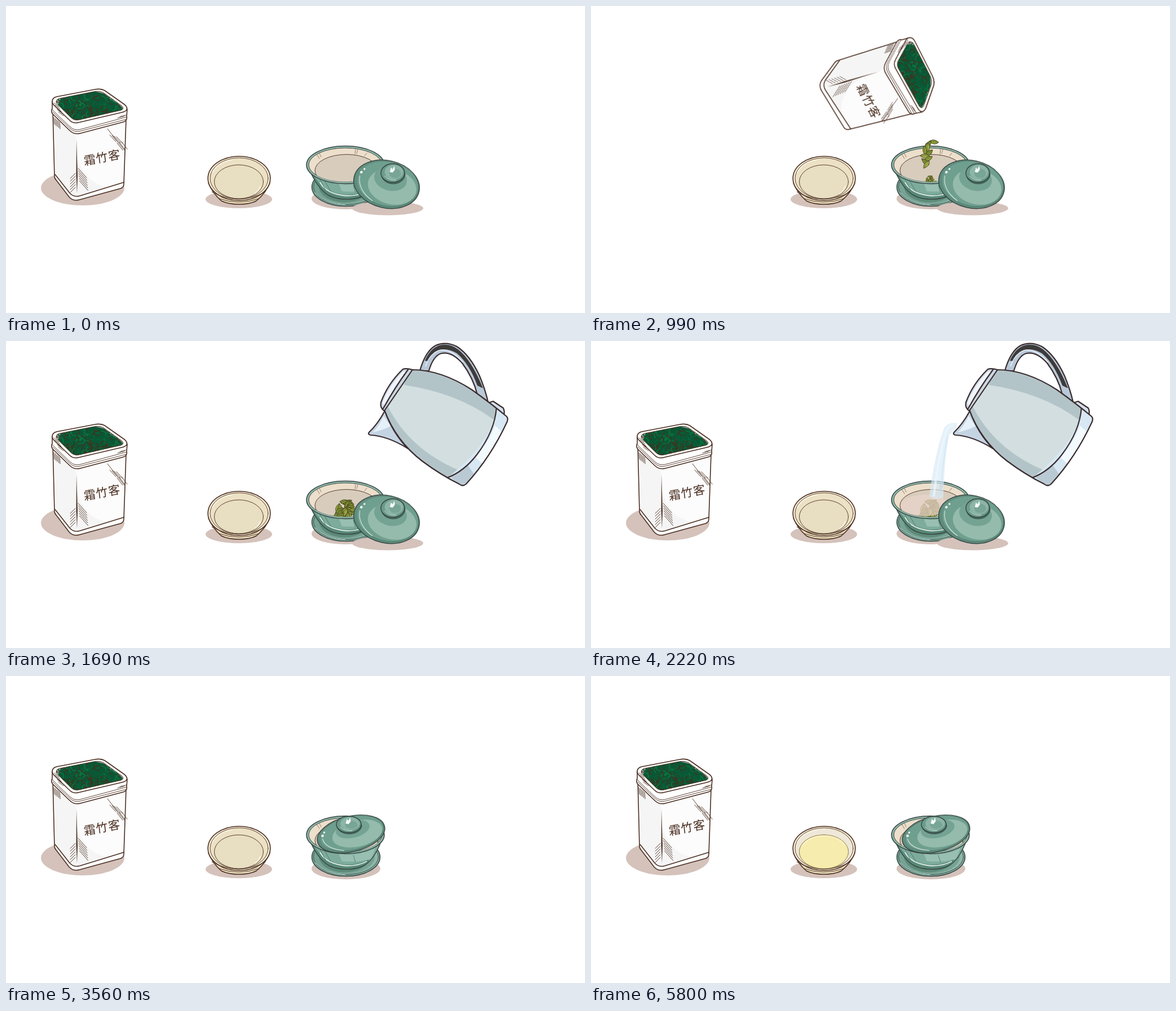
These frames come from a looping animation (1027x545 px, 6700 ms). An HTML page:

```html
<!DOCTYPE html>
<html lang="zh">
<head>
<meta charset="utf-8">
<title>Tea brewing</title>
<style>
html, body { margin: 0; width: 100%; height: 100%; overflow: hidden; background: #fff; }
svg { display: block; width: 1027px; height: 545px; }
.brown { stroke: #4a2e20; stroke-width: 1.6; stroke-linejoin: round; stroke-linecap: round; }
.teal { stroke: #3a4745; stroke-width: 1.5; stroke-linejoin: round; stroke-linecap: round; }
.steel { stroke: #3b2d2f; stroke-width: 2.2; stroke-linejoin: round; stroke-linecap: round; }
.thin { stroke-width: .9; }
.none { fill: none; }
.shade { fill: #d4c2bb; }
.label { font: 500 21px "Noto Sans CJK SC", "Noto Serif", serif; letter-spacing: 1px; fill: #4a2e20; }
.a { animation: 6700ms step-end infinite; }

.stand { animation-name: stand; }
.tilt { animation-name: tilt; }
.fall { animation-name: fall; }
.pile { animation-name: pile; transform-origin: 600px 314px; }
.kettle { animation-name: kettle; transform-origin: 775px 130px; }
.stream { animation-name: stream; }
.water { animation-name: water; transform-origin: 592px 292px; }
.side { animation-name: side; }
.shut { animation-name: shut; }
.ajar { animation-name: ajar; }
.gaiwan { animation-name: gaiwan; }
.pour { animation-name: pour; }
.tea { animation-name: tea; transform-origin: 413px 342px; }
.wall { animation-name: wall; }

@keyframes stand { 0%, 21.194% { opacity: 1 } 10.895% { opacity: 0 } }
@keyframes tilt { 0%, 21.194% { opacity: 0 } 10.895% { opacity: 1 } }
@keyframes fall {
  0%, 16.119% { opacity: 0 }
  12.835% { opacity: 1; transform: none }
  13.582% { opacity: 1; transform: translateY(32px) }
  14.328% { opacity: 1; transform: translateY(64px) }
  15.074% { opacity: 1; transform: translateY(92px) }
}
@keyframes pile {
  0%, 36.566% { opacity: 0 }
  14.328% { opacity: 1; transform: scale(.4) }
  15.074% { opacity: 1; transform: scale(.6) }
  16.119% { opacity: 1; transform: scale(.82) }
  17.164% { opacity: 1; transform: none }
}
@keyframes kettle {
  0%, 40.597% { opacity: 0 }
  22.686%, 39.104% { opacity: 1; transform: rotate(10deg) }
  25.223% { opacity: 1; transform: none }
}
@keyframes stream {
  0%, 36.566% { opacity: 0; clip-path: none }
  25.223% { opacity: 1; clip-path: polygon(560px 0, 700px 0, 700px 225px, 560px 225px) }
  27.164% { opacity: 1; clip-path: none }
}
@keyframes water {
  0%, 36.566% { opacity: 0 }
  27.164% { opacity: .75; transform: scale(.6) }
  30.149% { opacity: .75; transform: scale(.8) }
  33.134% { opacity: .75; transform: none }
}
@keyframes side { 0% { opacity: 1 } 36.566%, 100% { opacity: 0 } }
@keyframes shut { 0%, 53.134% { opacity: 0 } 36.566% { opacity: 1 } }
@keyframes ajar { 0% { opacity: 0 } 53.134%, 100% { opacity: 1 } }
@keyframes gaiwan {
  0%, 86.566% { transform: none }
  60.149% { transform: translate(540px, 198px) rotate(-15deg) translate(-608px, -264px) }
  67.164% { transform: translate(485px, 193px) rotate(-35.5deg) translate(-608px, -264px) }
}
@keyframes pour { 0%, 77.164% { opacity: 0 } 68.208% { opacity: 1 } }
@keyframes tea {
  0% { opacity: 0; transform: scale(.48) }
  68.208% { opacity: 1; transform: scale(.48) }
  73.134% { opacity: 1; transform: scale(.54); animation-timing-function: steps(8, end) }
  77.164%, 100% { opacity: 1; transform: none }
}
@keyframes wall { 0% { opacity: 0 } 77.164%, 100% { opacity: 1 } }
</style>
</head>
<body>
<svg viewBox="0 0 1027 545">
<defs>
  <clipPath id="mouth"><path d="M89 172Q88 166 95 164L156 152Q166 150 173 154L205 177Q211 182 204 185L130 202Q121 204 115 198Z"/></clipPath>
  <clipPath id="bowlIn"><ellipse cx="602" cy="282" rx="65" ry="30"/></clipPath>
  <clipPath id="bowlOut"><path id="bowlShape" d="M541 297Q556 328 574 337Q586 343 604 343Q624 343 636 336Q652 326 664 297Z"/></clipPath>
  <clipPath id="kettleBody"><path id="body" d="M720 51Q772 51 827 87Q863 113 888 134Q891 137 889 143Q860 206 816 254Q810 259 804 254Q770 237 738 213Q691 177 671 122Z"/></clipPath>

  <g id="tin" class="brown none">
    <path d="M83 186L86 302Q86 306 89 309L112 339Q119 347 130 344L203 324Q209 322 209 316L213 200L122 222Z" fill="#fcfcfc"/>
    <path d="M85 196L122 226L126 240L126 335Q118 337 112 330L88 300Z" fill="#f5f5f5" stroke="none"/>
    <path d="M127 270Q140 314 178 321L131 336L127 331Z" fill="#f5f5f5" stroke="none"/>
    <path d="M87 299L113 332Q120 340 131 337L209 313"/>
    <path d="M125 238L127 300L126 333L124.500 300Z" fill="#4a2e20" stroke="none"/>
    <path d="M82 170L82 182Q79 187 83 192L113 221Q121 229 132 226L208 206Q216 203 214 196L215 183L170 148Z" fill="#fff"/>
    <path d="M82 184L113 214Q121 222 132 219L214 197M83 188L113 217Q121 225 132 222L214 201" class="thin"/>
    <path d="M82 172Q81 163 90 161L158 148Q168 146 175 150L209 174Q216 179 214 184Q213 187 205 189L128 207Q119 209 113 203L86 177Q82 173 82 170" fill="#fff"/>
    <g clip-path="url(#mouth)">
      <path d="M80 145h140v65h-140z" fill="#a3a09e" stroke="none"/>
      <path d="M92 176L97 164Q108 164 113 157Q126 159 134 154Q147 155 155 151L175 156L187 167Q198 170 207 182L200 200L120 208Z" fill="#0a5735" stroke="none"/>
      <g id="leaves"></g>
    </g>
    <path d="M89 172Q88 166 95 164L156 152Q166 150 173 154L205 177Q211 182 204 185L130 202Q121 204 115 198Z" class="thin"/>
    <path id="hatch" class="thin"/>
    <text class="label" stroke="none" transform="translate(139 283) rotate(-11) skewX(-4)">霜竹客</text>
  </g>
</defs>

<g class="a stand">
  <ellipse class="shade" cx="136" cy="323" rx="74" ry="31"/>
  <use href="#tin"/>
</g>

<!-- cup -->
<ellipse class="shade" cx="413" cy="343" rx="59" ry="16"/>
<g class="brown none">
  <path d="M359 314Q366 332 382 346Q394 352 413 352Q433 352 444 346Q461 332 468 314Z" fill="#e6d9ba"/>
  <path d="M378 342Q412 354 449 342" class="thin"/>
  <ellipse cx="413.500" cy="306" rx="55.300" ry="39.300" fill="#f7eed8"/>
  <ellipse cx="413.500" cy="306" rx="51.500" ry="36.500" fill="#ece1c5" class="thin"/>
  <ellipse class="a wall" cx="413.500" cy="306" rx="50.500" ry="35.500" fill="#eee8d9" stroke="none"/>
  <ellipse cx="413" cy="312" rx="43.500" ry="30" fill="#e8dec1" class="thin"/>
  <path d="M366 295Q376 277 401 273M451 320Q448 329 441 333" stroke="#fbf6e7"/>
  <g class="a tea">
    <ellipse cx="413" cy="312" rx="43.500" ry="30" fill="#f6ecad" stroke="#a8905b" stroke-width=".8"/>
    <path d="M376 300Q388 284 414 284Q438 284 449 299" stroke="#fffbe2" stroke-width="1.200"/>
  </g>
  <path d="M365 330Q412 356 460 330" class="thin"/>
</g>
<path class="a pour" d="M445 244Q432 244 428 256Q419 285 409 326Q415 330 421 326Q430 288 438 264Z" fill="#f5ecb4" opacity=".9"/>

<!-- saucer -->
<ellipse class="shade" cx="603" cy="342" rx="61" ry="19"/>
<ellipse class="teal" cx="603" cy="321.500" rx="60.500" ry="34" fill="#76a395"/>
<ellipse cx="606" cy="321" rx="55" ry="31" fill="#90b7a9"/>
<ellipse cx="602" cy="321" rx="52" ry="30" fill="#76a293"/>
<ellipse cx="600" cy="320" rx="45" ry="28.500" fill="#5d8a79"/>
<ellipse class="teal none thin" cx="603" cy="321" rx="57.500" ry="31.500"/>
<path class="none" d="M548 331Q566 351 602 353" stroke="#b9d4ca" stroke-width="1"/>

<g class="a gaiwan">
  <g clip-path="url(#bowlOut)">
    <path d="M530 280h140v70h-140z" fill="#7dab9c"/>
    <path d="M540 290Q558 332 604 335Q634 334 646 322L636 345L560 345L538 300Z" fill="#588877"/>
    <path d="M590 315Q620 322 655 306L648 325Q626 331 596 329Z" fill="#98bfb1"/>
    <path class="none" d="M557 313Q568 334 604 337Q626 337 640 329" stroke="#dcebe5" stroke-width="1.800"/>
    <path class="none" d="M556 306L567 327M566 312L576 329M616 318L620 331" stroke="#3a6557" stroke-width=".7"/>
  </g>
  <use href="#bowlShape" class="teal none"/>
  <ellipse class="teal" cx="602" cy="282" rx="69" ry="33.500" fill="#77a495"/>
  <ellipse class="none" cx="602" cy="282" rx="67" ry="31.700" stroke="#a9c9be"/>
  <ellipse class="teal thin" cx="602" cy="282" rx="65" ry="30" fill="#ecdfcb"/>
  <g clip-path="url(#bowlIn)">
    <ellipse class="brown thin" cx="604" cy="292" rx="56" ry="28.500" fill="#d8ccbd"/>
    <path class="brown none thin" d="M551 263L556 271M555 260L559 268M620 255L619 263M624 255L622 262M640 261L636 266" opacity=".6"/>
    <g id="pile" class="a pile"></g>
    <ellipse class="a water" cx="592" cy="292" rx="43" ry="19" fill="#ead4ca"/>
  </g>
  <g id="shut" class="a shut"></g>
  <g id="ajar" class="a ajar"></g>
</g>

<g id="fall" class="a fall"></g>
<use href="#tin" class="a tilt" style="transform: translate(704px, -69px) rotate(74deg)"/>

<g class="a stream">
  <path d="M650 146Q630 143 625 158Q610 200 600 276Q612 283 625 278Q626 215 635 168L648 153Z" fill="#d8eaf7" opacity=".68"/>
  <path class="none" d="M642 149Q631 151 628 166Q614 220 608 276" stroke="#eef7fd" stroke-width="4" opacity=".7"/>
  <path class="none" d="M632 170Q622 225 621 275" stroke="#bfdcf0" stroke-width="1.500" opacity=".5"/>
</g>

<g id="side" class="a side"><ellipse class="shade" cx="677" cy="359" rx="63" ry="12.500"/></g>

<g class="a kettle">
  <path class="steel" d="M734 53Q744 18 762 8Q780 0 800 10Q823 25 840 62Q850 86 855 108L836 95Q829 66 809 39Q790 18 772 22Q758 26 750 53Z" fill="#b9c8d8"/>
  <path d="M743 35Q752 14 768 8Q786 3 802 15Q826 34 846 84L836 79Q822 41 800 22Q778 9 762 20Q754 25 749 36Z" fill="#3d3b3a"/>
  <path class="none" d="M744 45Q753 20 771 16Q790 14 811 38" stroke="#eaf2fa" stroke-width="1.600"/>
  <path class="steel" d="M855 110L864 107L882 119Q885 125 883 132L870 124Z" fill="#d5dfec"/>
  <path class="steel" d="M672 124Q659 148 644 162Q641 166 647 167Q678 169 713 191Q686 164 672 124Z" fill="#c4d4e2"/>
  <path d="M670 133Q662 150 651 162Q670 158 682 151Z" fill="#e5f0f9"/>
  <g clip-path="url(#kettleBody)">
    <path d="M650 40h250v225h-250z" fill="#d2dedf"/>
    <path d="M715 48L780 48L895 125L864 139Q800 92 706 78Z" fill="#b3c4c9"/>
    <path d="M665 115L677 116Q716 192 802 229L790 255L700 210Z" fill="#b3c4c9"/>
    <path d="M870 118Q864 178 782 244L812 262L897 138Z" fill="#d7e7f3"/>
    <path d="M867 150Q858 178 832 206L849 222Q872 192 884 165Z" fill="#f3fafe"/>
    <path d="M789 242L812 261L832 239L818 219Z" fill="#b9cad5"/>
    <path class="steel none" d="M870 118Q867 160 835 202Q812 232 782 243" stroke-width="1.300"/>
  </g>
  <use href="#body" class="steel none"/>
  <path class="steel" d="M704 50Q710 48 721 51L671 124Q663 119 665 109Q677 76 704 50Z" fill="#cbd7e4"/>
  <path d="M704 54L710 54Q688 81 672 115Q667 113 668 108Q681 77 704 54Z" fill="#eff5fb"/>
  <path class="steel none" d="M713 51Q690 82 669 120" stroke-width="1.200"/>
</g>
</svg>

<script>
const $ = id => document.getElementById(id);
let seed = 7;
const rnd = () => (seed = seed * 16807 % 2147483647) / 2147483647;
const span = (a, b) => a + (b - a) * rnd();

// Curled leaves in the tin
let curls = '';
for (let i = 0; i < 150; i++) {
  const color = ['#0c7a45', '#42301c', '#0a6239', '#4a2e20'][i % 4];
  const spot = `translate(${span(90, 206).toFixed(1)} ${span(155, 203).toFixed(1)}) rotate(${(rnd() * 360).toFixed()})`;
  curls += `<path d="M-5 2Q0 -5 6 1" stroke="${color}" stroke-width="1.200" transform="${spot}"/>`;
}
$('leaves').innerHTML = curls;

// Rows of parallel pen strokes: start, count, step, stroke vector
const rows = [
  [128, 288, 6, .5, 4.5, 15, 17], [114, 331, 6, 0, -5, 9, -9],
  [180, 218, 1, 0, 0, 30, 38], [184, 229, 4, 4, 1, 11, 12], [197, 243, 3, 4, -1, 10, 13],
  [85, 172, 5, 2, 4, 9, 7], [85, 198, 5, 2.5, 2, 1, 12], [198, 199, 3, 4, -1, 8, -4]
];
$('hatch').setAttribute('d', rows.map(([x, y, n, sx, sy, dx, dy]) =>
  Array.from({ length: n }, (_, i) => `M${x + i * sx} ${y + i * sy}l${dx} ${dy}`).join('')).join(''));

const leaf = (x, y, turn, i) => `<g transform="translate(${x} ${y}) rotate(${turn})">
  <path d="M-8 2Q-3 -7 8 -4Q5 5 -8 2Z" fill="${['#8f9f3b', '#7f9135', '#a3af4c'][i % 3]}" stroke="#46451d" stroke-width=".9"/>
  <path d="M-6 1Q0 -2 6 -3" fill="none" stroke="#5a6426" stroke-width=".6"/></g>`;
let heap = '', drop = '';
for (let i = 0; i < 30; i++) {
  const y = 286 + i, half = 4 + i * .9;
  heap += leaf(span(602 - half, 602 + half).toFixed(1), y.toFixed(1), span(-75, 30).toFixed(), i);
}
for (let i = 0; i < 9; i++) {
  drop += leaf(span(590, 610).toFixed(1), 178 + i * 5, span(-90, 90).toFixed(), i);
}
$('pile').innerHTML = heap;
$('fall').innerHTML = drop;

function lid(cx, cy, rx, ry, turn, kx, ky, kw, kh) {
  const oval = (x, y, s, rest) => `<ellipse cx="${x * rx}" cy="${y * ry}" rx="${rx * s}" ry="${ry * s}" ${rest}/>`;
  const knob = (x, y, s, rest) => `<ellipse cx="${kx + x * kw}" cy="${ky + y * kh}" rx="${kw * s}" ry="${kh * s}" ${rest}/>`;
  return `<g transform="translate(${cx} ${cy}) rotate(${turn})">` +
    oval(0, 0, 1, 'fill="#5c8d7c" class="teal"') +
    oval(.02, -.04, .95, 'fill="#6f9f8f"') +
    oval(.03, -.03, .94, 'class="teal none" stroke-opacity=".55" style="stroke-width:.7"') +
    oval(.18, .05, .74, 'fill="#95bbad"') +
    oval(.08, -.26, .5, 'fill="#74a393"') +
    `<path d="M${-rx * .84} ${-ry * .1}Q${-rx * .82} ${ry * .5} ${-rx * .3} ${ry * .82}" fill="none" stroke="#cfe3da" stroke-width="1.200"/>
     <g fill="#f4faf7"><circle cx="${-rx * .82}" cy="${-ry * .26}" r="2.300"/><circle cx="${-rx * .75}" cy="${-ry * .42}" r="1.700"/></g></g>
    <g transform="translate(${cx} ${cy})">` +
    knob(.04, .17, 1, 'fill="#426f61" class="teal thin"') +
    knob(0, 0, 1, 'fill="#6b9b8b" class="teal"') +
    knob(.1, -.1, .78, 'fill="#8db5a7"') +
    knob(.2, .05, .5, 'fill="#78a596"') +
    `<path d="M${kx - kw * .25} ${ky - kh * .1}l2 -8l3 3l3 -6l1 7l-4 5z" fill="#f6fbf9"/>
     <path d="M${kx - kw * .7} ${ky + kh * .3}Q${kx - kw * .3} ${ky + kh * .85} ${kx + kw * .3} ${ky + kh * .75}" fill="none" stroke="#d5e7df"/></g>`;
}
$('side').innerHTML += lid(675, 316.500, 59, 42, 13, 11, -20, 21, 16.500);
$('shut').innerHTML = lid(604, 280.500, 66, 33, 0, 2, -17, 22, 14.500);
$('ajar').innerHTML = lid(612, 280.500, 61, 31.500, -13, -4, -17, 22, 14.500);
</script>
</body>
</html>
```
